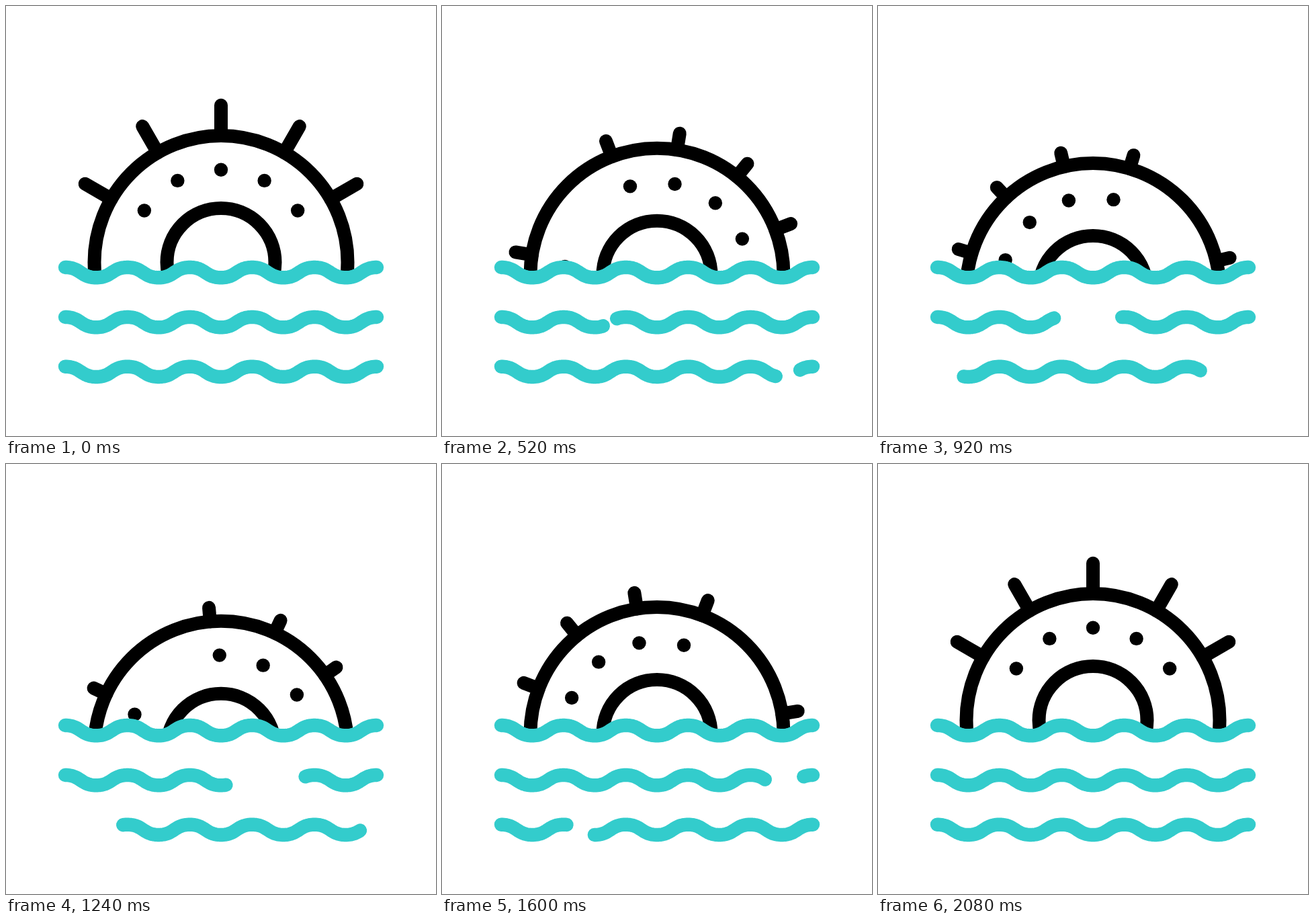
Animation, 640 px wide and 640 px high, one loop 2.12 s. Source, as an HTML page with a canvas:

```html
<!DOCTYPE html>
<html lang="en">
<head>
<meta charset="utf-8">
<title>Sun over the sea</title>
<style>
  html, body { margin: 0; width: 100%; height: 100%; overflow: hidden; background: #fff; }
  canvas { display: block; width: 100vw; height: 100vh; }
</style>
</head>
<body>
<canvas id="stage" width="640" height="640"></canvas>
<script>
const ctx = document.getElementById('stage').getContext('2d');
const LOOP = 2120, STEP = 40;
const SEA = '#33cccc', INK = '#000';
const CX = 320, REST_Y = 381.5;
const LEFT = 88, SPAN = 464, HALF = SPAN / 10, DIP = 15.3;
const rad = deg => deg * Math.PI / 180;

// Symmetric cubic Bezier easing (a, 0, 1 - a, 1)
function ease(x, a = 0.42) {
  if (x <= 0) return 0;
  if (x >= 1) return 1;
  let lo = 0, hi = 1, u = x;
  for (let i = 0; i < 24; i++) {
    u = (lo + hi) / 2;
    const v = 1 - u;
    if (3 * v * v * u * a + 3 * v * u * u * (1 - a) + u * u * u < x) lo = u;
    else hi = u;
  }
  return u * u * (3 - 2 * u);
}

// Rises from 0 to 1 between a and b, falls back between c and d
const hump = (t, a, b, c, d) => ease((t - a) / (b - a)) - ease((t - c) / (d - c));

function waveY(x) {
  const n = (x - LEFT) / HALF;
  const i = Math.floor(n);
  const p = ease(n - i, 0.5);
  return DIP * (i % 2 ? 1 - p : p);
}

// Part of a wave, from and to given as fractions of its width
function addWave(path, y, from, to) {
  const x0 = LEFT + from * SPAN, x1 = LEFT + to * SPAN;
  const n = Math.max(1, Math.ceil((x1 - x0) / 2));
  for (let i = 0; i <= n; i++) {
    const x = x0 + (x1 - x0) * i / n;
    path.lineTo(x, y + waveY(x));
  }
}

function strokeWave(y, from, to) {
  const path = new Path2D();
  addWave(path, y, from, to);
  ctx.stroke(path);
}

// Wave with a gap that ends at `end` and wraps around the line
function gapWave(y, end, gap) {
  if (gap <= 0) return strokeWave(y, 0, 1);
  const stop = end - gap + 1;
  for (let k = 0; k < 3; k++) {
    const from = Math.max(end - k, 0), to = Math.min(stop - k, 1);
    if (to > from) strokeWave(y, from, to);
  }
}

const sky = new Path2D();
sky.moveTo(0, 0);
sky.lineTo(0, 389);
addWave(sky, 389, 0, 1);
sky.lineTo(640, 389);
sky.lineTo(640, 0);
sky.closePath();

function ring(r) {
  ctx.beginPath();
  ctx.arc(0, 0, r, 0, 2 * Math.PI);
  ctx.stroke();
}

function drawSun(t) {
  const turn = 360 * ease((t - 50) / 2020, 0.43);
  const sink = 43 * hump(t, 40, 1080, 1080, 2080);
  const tip = 233.7 - 24.5 * hump(t, 160, 660, 1440, 2080);
  ctx.save();
  ctx.clip(sky);
  ctx.translate(CX, REST_Y + sink);
  ctx.strokeStyle = ctx.fillStyle = INK;
  ctx.lineWidth = 20;
  ring(188.5);
  ring(80.5);
  for (const side of [0, 180]) {
    for (let i = -2; i <= 2; i++) {
      const ray = rad(side + turn + 30 * i);
      const dot = rad(side + turn + 28 * i);
      ctx.beginPath();
      ctx.moveTo(188.5 * Math.sin(ray), -188.5 * Math.cos(ray));
      ctx.lineTo(tip * Math.sin(ray), -tip * Math.cos(ray));
      ctx.stroke();
      ctx.beginPath();
      ctx.arc(137.7 * Math.sin(dot), -137.7 * Math.cos(dot), 10.2, 0, 2 * Math.PI);
      ctx.fill();
    }
  }
  ctx.restore();
}

function drawSea(t) {
  ctx.strokeStyle = SEA;
  ctx.lineWidth = 20.4;
  strokeWave(389, 0, 1);
  gapWave(463, 0.371 + 0.000555 * (t - 520), 0.258 * hump(t, 260, 1170, 1170, 2010));
  gapWave(536.7, 0.959 + 0.000315 * (t - 520), 0.257 * hump(t, 174, 1080, 1080, 1960));
}

function draw(t) {
  ctx.fillStyle = '#fff';
  ctx.fillRect(0, 0, 640, 640);
  ctx.lineCap = ctx.lineJoin = 'round';
  drawSun(t);
  drawSea(t);
}

const start = performance.now();
function tick() {
  const t = (performance.now() - start) % LOOP;
  draw(Math.floor(t / STEP) * STEP);
  requestAnimationFrame(tick);
}
tick();
</script>
</body>
</html>
```
